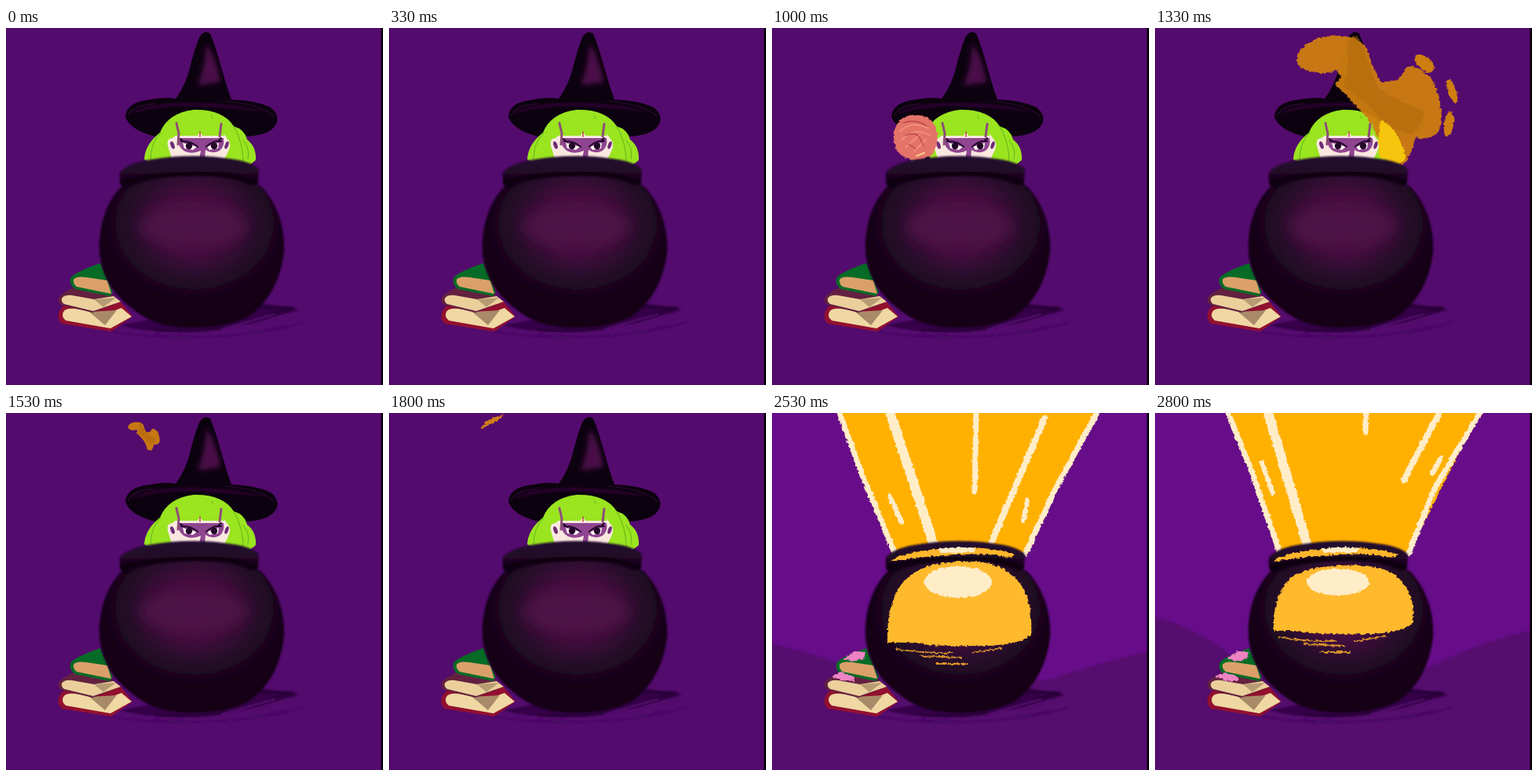
An HTML page that plays this animation: 480 px wide and 454 px high, repeating every 2.87 s.

```html
<!DOCTYPE html>
<html lang="en">
<head>
<meta charset="utf-8">
<title>Witch in a cauldron</title>
<style>
html, body { margin: 0; width: 100%; height: 100%; overflow: hidden; background: #540b6e; }
svg { display: block; width: 100vw; height: 100vh; }
.line { fill: none; stroke-linecap: round; stroke-linejoin: round; }
</style>
</head>
<body>
<svg viewBox="0 0 480 454" preserveAspectRatio="none">
  <defs>
    <radialGradient id="pot" gradientUnits="userSpaceOnUse" cx="0" cy="0" r="1" gradientTransform="translate(240 249) scale(122 102)">
      <stop offset="0" stop-color="#4b1145"/>
      <stop offset=".36" stop-color="#45103f"/>
      <stop offset=".62" stop-color="#2c0b2e"/>
      <stop offset=".85" stop-color="#1b061d"/>
      <stop offset="1" stop-color="#130316"/>
    </radialGradient>
    <linearGradient id="rim" x2="0" y2="1">
      <stop offset="0" stop-color="#250830"/>
      <stop offset=".5" stop-color="#220727"/>
      <stop offset="1" stop-color="#0d0210"/>
    </linearGradient>
    <filter id="rough" x="-20%" y="-20%" width="140%" height="140%" color-interpolation-filters="sRGB">
      <feTurbulence id="grain" type="fractalNoise" baseFrequency=".25" numOctaves="2"/>
      <feDisplacementMap in="SourceGraphic" scale="4.5" xChannelSelector="R" yChannelSelector="G"/>
    </filter>
    <filter id="soft" x="-30%" y="-30%" width="160%" height="160%"><feGaussianBlur stdDeviation="3"/></filter>
    <filter id="haze" x="-30%" y="-60%" width="160%" height="220%"><feGaussianBlur stdDeviation="8"/></filter>
    <filter id="edge" x="-10%" y="-10%" width="120%" height="120%"><feGaussianBlur stdDeviation=".9"/></filter>
  </defs>

  <rect id="sky" width="480" height="454" fill="#540b6e"/>
  <path id="ground" fill="#550c6e" filter="url(#edge)"/>

  <g id="shadow" filter="url(#edge)">
    <path fill="#360648" d="M145 378Q190 390 250 386L330 373L374 358L325 350L240 360Z"/>
    <path class="line" stroke="#270434" stroke-width="3" d="M320 354L366 356L335 364M190 384Q240 388 285 380"/>
    <path class="line" stroke="#440860" stroke-width="1.6" d="M135 386Q190 397 290 391M190 390Q280 399 355 378M300 389Q345 386 378 374"/>
    <path class="line" stroke="#540b6e" stroke-width="2" d="M275 383L342 364M308 379L358 364M180 387L235 389"/>
  </g>

  <g id="witch">
    <path fill="#0c020f" d="M246 12Q252 2 260 7Q267 24 275 53Q282 78 287 91Q318 92 337 101Q348 110 345 120Q338 137 304 138H190Q158 130 152 113Q153 94 184 91Q205 87 216 90Q229 72 234 51Q240 27 246 12Z"/>
    <path fill="#250629" filter="url(#edge)" d="M160 109Q171 97 224 95Q281 93 335 107Q309 104 260 101Q210 96 160 109Z"/>
    <path fill="#4b0f49" filter="url(#soft)" d="M255 20Q267 36 273 69L244 73Q254 48 255 20Z"/>
    <path class="line" stroke="#2f0935" stroke-width="1.2" d="M155 111Q166 96 190 97M280 93Q325 97 341 112"/>

    <path fill="#9ae420" d="M176 167Q177 148 196 133Q206 108 239 104Q276 103 290 125Q304 129 307 142Q319 151 318 168L308 176H190Z"/>
    <path class="line" stroke="#62b519" stroke-width="1" d="M197 133Q184 146 184 167M290 125Q302 146 302 169M302 143Q311 153 308 167M230 115Q226 124 227 136M262 112Q266 124 266 136M239 117V135"/>
    <path fill="#fae8e0" d="M206 150Q204 140 212 140L219 134L277 134L282 141Q288 147 283 157L277 169H212Z"/>
    <path fill="#8f4590" d="M219 140H277Q279 150 272 156Q262 161 254 155L253 167H246L248 156Q235 162 225 155Q218 149 219 140Z"/>
    <path fill="#9ae420" d="M216 137Q220 119 240 108Q268 109 278 137L250 137L247 131L244 137Z"/>
    <path class="line" stroke="#8d4d78" stroke-width="3" d="M217 121L220 134L219 148M274 122L272 138"/>
    <g fill="#6e2c74">
      <ellipse cx="212" cy="149" rx="2.4" ry="5" transform="rotate(-20 212 149)"/>
      <ellipse cx="281" cy="149" rx="2.2" ry="5" transform="rotate(20 281 149)"/>
    </g>
    <g fill="#fff7f2"><path d="M225 146L243 151L238 155L227 153Z"/><path d="M256 151L271 146L270 153L259 155Z"/></g>
    <g fill="#220828"><circle cx="233" cy="150" r="4.2"/><circle cx="265" cy="150" r="4.2"/></g>
    <path class="line" stroke="#24072c" stroke-width="2" d="M223 144Q235 143 244 151M255 151Q264 142 274 144M222 141L227 145M274 140L270 144"/>
    <path class="line" stroke="#b8493f" stroke-width="1.5" d="M247 132V138"/>
  </g>

  <g id="hand">
    <path fill="#270733" d="M174 146L201 139L203 230H172Z"/>
    <path class="line" stroke="#eee0e5" stroke-width="2" d="M178 146L184 149L190 145L199 147"/>
    <path fill="#e47368" filter="url(#rough)" d="M155 118Q153 93 176 87Q207 84 211 112Q210 137 195 142Q173 150 158 131Z"/>
    <path class="line" stroke="#f08f7e" stroke-width="2" d="M163 108Q177 93 199 104M165 119Q181 101 201 113M170 128L188 112M181 133L196 118"/>
    <path class="line" stroke="#b9474d" stroke-width="1.3" d="M167 97Q182 91 197 101M170 113Q180 108 187 114L193 126M174 124L183 130"/>
    <path class="line" stroke="#f8ca85" stroke-width="2" d="M184 139L194 135"/>
  </g>

  <g id="swoosh" filter="url(#rough)">
    <path fill="#cf7e10" fill-opacity=".95" d="M181 42Q180 22 211 12Q253 4 270 26Q276 50 287 68Q310 70 316 57Q320 43 338 53Q358 64 361 89Q370 123 359 134Q346 143 332 139Q325 164 316 174L293 169Q284 130 266 110Q248 88 228 71Q242 65 231 54Q211 60 198 55Q183 52 181 42Z"/>
    <path fill="#b46c0f" fill-opacity=".65" d="M249 12Q258 5 264 25L284 75Q310 95 340 104Q346 120 325 136L295 125Q273 95 239 74Q250 48 244 31Z"/>
    <path id="litHair" fill="#f5c60d" d="M288 116Q315 135 319 167L308 174L286 165Q282 136 288 116Z"/>
  </g>
  <g id="flecks" fill="#cf7e10" filter="url(#rough)">
    <ellipse cx="343" cy="45" rx="15" ry="8" transform="rotate(40 343 45)"/>
    <ellipse cx="378" cy="80" rx="5" ry="16" transform="rotate(-18 378 80)"/>
    <ellipse cx="374" cy="122" rx="6" ry="16" transform="rotate(8 374 122)"/>
  </g>
  <path id="streak" fill="#d07c18" filter="url(#rough)" d="M-15 11Q-10 0 2 -4L15 -9Q12 -1 1 3Z"/>

  <g id="beam">
    <g filter="url(#rough)">
      <path id="cone" fill="#ffb000"/>
      <path id="coneEdge" class="line" stroke="#ffedc8" stroke-width="7"/>
      <g id="rays" class="line" stroke="#ffedc8"></g>
    </g>
  </g>

  <g id="books">
    <path fill="#92102f" d="M68 360Q72 350 87 351L145 347L161 367L134 386L71 376Q64 369 68 360Z"/>
    <path fill="#efd8a3" d="M73 361Q76 356 88 357L128 363L147 356L160 367L133 382L76 372Q70 367 73 361Z"/>
    <path fill="#a98a68" d="M106 361L141 359L126 378Z"/>
    <path fill="#63213f" d="M67 343Q69 338 88 329L134 338L146 348L110 362L70 352Q66 349 67 343Z"/>
    <path fill="#ebd09c" d="M71 344Q74 339 84 340L112 345L137 341L146 348L111 360L74 351Q70 348 71 344Z"/>
    <path fill="#b79b72" d="M112 345L140 343L124 355Z"/>
    <path fill="#066b26" d="M82 318Q86 311 120 299L136 336L132 341L88 332Q80 327 82 318Z"/>
    <path fill="#dba06a" d="M86 320Q89 315 102 317L129 321L134 338L90 329Q85 325 86 320Z"/>
    <g id="bookGlow" fill="#ee83c4" filter="url(#rough)">
      <path d="M91 313L105 303L119 304L117 312L105 316Z"/>
      <path d="M77 335L88 330L106 336L105 341L87 340Z"/>
    </g>
  </g>

  <g id="cauldron">
    <path fill="url(#pot)" stroke="#1f0528" filter="url(#edge)" d="M150 199Q184 185 237 185Q293 184 325 202Q354 233 354 282Q348 340 307 368Q275 382 238 381Q190 382 160 356Q119 325 119 276Q121 226 150 199Z"/>
    <ellipse id="sheen" cx="239" cy="252" rx="68" ry="26" fill="#511249" filter="url(#haze)" opacity=".7"/>
    <path fill="url(#rim)" filter="url(#edge)" d="M145 184Q153 173 180 168Q237 158 290 167Q315 171 322 180L321 197Q314 203 302 196Q267 185 217 189Q178 191 153 204Q143 202 145 184Z"/>
    <path fill="none" stroke="#0b020e" stroke-width="5" filter="url(#edge)" d="M146 197Q180 187 230 185Q289 182 319 198"/>
  </g>

  <g id="potGlow" filter="url(#rough)">
    <path fill="#ffb62c" d="M151 189Q160 176 235 171Q282 170 310 180Q304 187 282 180Q220 177 151 189Z"/>
    <path fill="#ffedc8" d="M211 173Q238 169 260 172L257 177L216 178Z"/>
    <path id="reflection" fill="#ffb92d"/>
    <ellipse id="shine" fill="#ffedc8"/>
    <path id="glints" class="line" stroke="#d6912c" stroke-width="1.8"/>
  </g>

  <path stroke="#020003" stroke-width="3" d="M479 0V454"/>
</svg>
<script>
const LOOP = 2870, STEP = LOOP / 43;
const SHOT = 2536, SPAN = 267, BEAM_START = 2395;
const el = id => document.getElementById(id);
const clamp = x => Math.max(0, Math.min(1, x));
const progress = (t, start, end) => clamp((t - start) / (end - start));
const ease = x => x * x * (3 - 2 * x);
const mix = (a, b, u) => a + (b - a) * u;
const show = (id, on) => el(id).setAttribute("display", on ? "inline" : "none");
const set = (id, attrs) => {
  for (const name in attrs) el(id).setAttribute(name, attrs[name]);
};

// Each ray: start line, end line, width.
const rays = [
  [[149, -4, 205, 164], [143, -4, 193, 165], 12],
  [[150, 106, 165, 139], [136, 63, 150, 102], 6],
  [[260, -4, 258, 100], [269, -50, 268, 24], 7],
  [[347, 7, 280, 163], [366, -8, 317, 85], 8],
  [[325, 111, 320, 137], [364, 57, 353, 77], 6]
];
const rayNodes = rays.map(([, , width]) => {
  const node = document.createElementNS("http://www.w3.org/2000/svg", "line");
  node.setAttribute("stroke-width", width);
  return el("rays").appendChild(node);
});

function drawHand(t) {
  const visible = t > 590 && t < 1125;
  show("hand", visible);
  if (!visible) return;
  const lift = ease(progress(t, 530, 665)) - ease(progress(t, 930, 1130));
  set("hand", { transform: `translate(0 ${(1 - lift) * 82})` });
}

function drawSwoosh(t) {
  const grow = ease(progress(t, 1090, 1325));
  const leave = ease(progress(t, 1340, 1620));
  const size = grow * (1 - leave);
  const [x, y] = leave ? [188, 30] : [305, 165];
  show("swoosh", size > .01);
  show("litHair", !leave);
  set("swoosh", {
    transform: `translate(${x - 40 * leave} ${y - 18 * leave}) scale(${size}) translate(${-x} ${-y})`
  });
  show("flecks", t > 1260 && t < 1535);
  set("flecks", { opacity: 1 - progress(t, 1400, 1535) });
  show("streak", t > 1590 && t < 1930);
  const fly = (t - 1802) / 200;
  set("streak", { transform: `translate(${131 - 58 * fly} ${10 - 24 * fly})` });
}

function drawBeam(t) {
  const lit = t >= BEAM_START;
  for (const id of ["beam", "bookGlow", "potGlow", "ground"]) show(id, lit);
  show("witch", !lit);
  show("sheen", !lit);
  set("sky", { fill: lit ? "#670d89" : "#540b6e" });
  if (!lit) return;

  const u = (t - SHOT) / SPAN;
  const rise = mix(.45, 1, progress(t, BEAM_START, 2470));
  const left = mix(84, 91, u), base = mix(156, 159, u);
  const side = `M${left} -6L${mix(113, 123, u)} 74L${base} 178`;
  set("cone", { d: `${side}H323L416 -6Z` });
  set("coneEdge", { d: `${side}M323 178L${mix(361, 356, u)} 96L417 -6` });
  set("beam", { transform: `translate(0 ${178 * (1 - rise)}) scale(1 ${rise})` });
  rays.forEach(([from, to], i) => {
    ["x1", "y1", "x2", "y2"].forEach((name, k) =>
      rayNodes[i].setAttribute(name, mix(from[k], to[k], u)));
  });

  const x = mix(147, 151, u), low = mix(296, 281, u), top = mix(190, 195, u);
  set("reflection", { d: `M${x} ${low - 4}Q${x - 2} 235 172 210Q194 ${top} 238 ${top - 1}Q286 ${top - 4} 307 207Q333 230 ${mix(330, 328, u)} ${low - 15}Q322 ${low - 3} 278 ${low}Q235 ${low + 1} 200 ${low - 1}Q177 ${low - 5} ${x} ${low - 4}Z` });
  set("shine", { cx: mix(237, 233, u), cy: 215, rx: mix(43, 40, u), ry: mix(20, 17, u) });
  set("glints", { d: `M158 ${low + 4}Q190 ${low + 10} 230 ${low + 9}M190 ${low + 13}L240 ${low + 15}M255 ${low + 9}L293 ${low + 3}M210 ${low + 23}L248 ${low + 23}` });
  const hillL = mix(294, 260, u), hillR = mix(303, 276, u);
  set("ground", { d: `M0 ${hillL}Q42 ${hillL + 9} 89 ${mix(319, 302, u)}L120 333L350 ${mix(340, 323, u)}Q411 ${hillR + 16} 480 ${hillR}V454H0Z` });
}

function render(time) {
  const frame = Math.floor((time % LOOP) / STEP + .1) % 43;
  const t = frame * STEP;
  set("grain", { seed: frame % 5 });
  drawHand(t);
  drawSwoosh(t);
  drawBeam(t);
}

const started = performance.now();
function tick() {
  render(performance.now() - started);
  requestAnimationFrame(tick);
}
tick();
</script>
</body>
</html>
```
